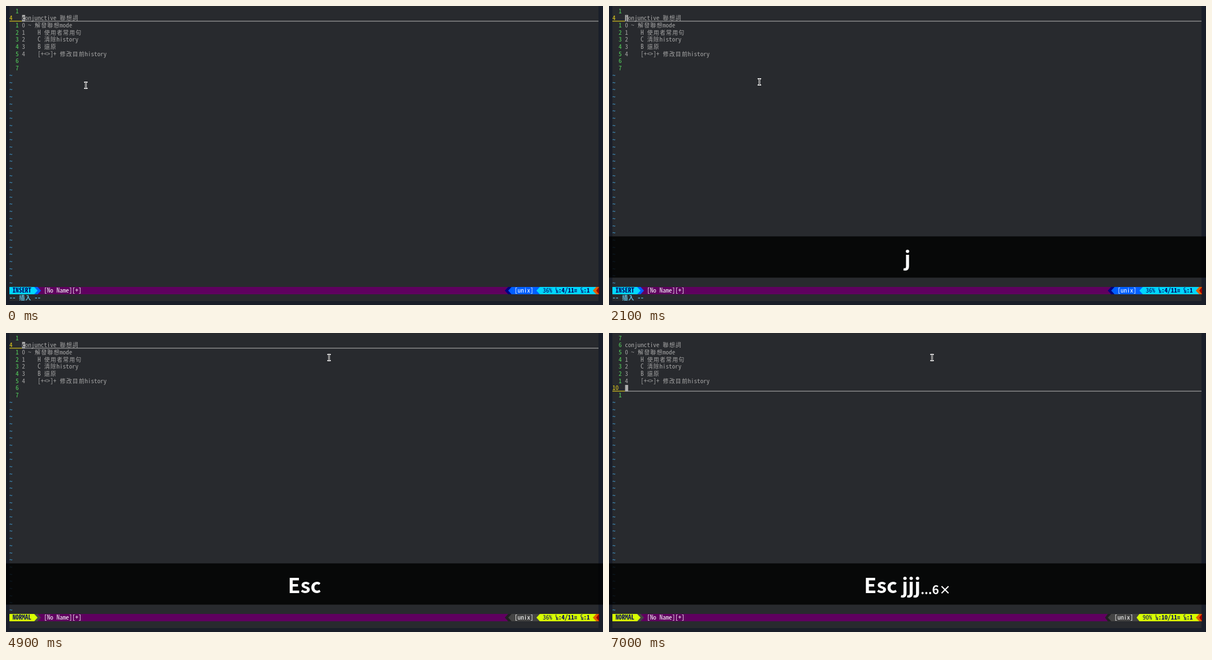
Animation, 1058 px wide and 530 px high, one loop 8 s. Source, as an HTML page with a canvas:

```html
<!DOCTYPE html>
<html lang="zh-Hant">
<head>
<meta charset="utf-8">
<title>Editor session</title>
<style>
html, body { margin: 0; width: 100%; height: 100%; overflow: hidden; background: #191e29; }
canvas { display: block; }
</style>
</head>
<body>
<canvas id="stage" width="1058" height="530"></canvas>
<script>
const ctx = document.getElementById('stage').getContext('2d');
const W = 1058, H = 530, LOOP = 8000;
const CELL = 5.56, ROW = 12.7, LEFT = 6, TOP = 2.65, RIGHT = 1050;
const COLS = 188, GUTTER = 4, STATUS_ROW = 39;
const MONO = '"Noto Sans Mono CJK TC", "Noto Sans Mono CJK JP", "Noto Sans Mono CJK SC", "Noto Sans Mono", monospace';
const SANS = '"Noto Sans CJK TC", "Noto Sans CJK JP", "Noto Sans CJK SC", "Noto Sans", sans-serif';
const BG = '#282a2e', FG = '#aeaeae', TEXT = '#a4a4a4';
const GREEN = '#55d35d', YELLOW = '#e8d21c', TILDE = '#3c86b4';

const LINES = [
  '',
  'conjunctive 聯想詞',
  '0 ~ 解發聯想mode',
  '1    H 使用者常用句',
  '2    C 清除history',
  '3    B 還原',
  '4    [+<>]+ 修改目前history',
  '',
  ''
];
const FIRST = 3; // file line shown on the top row
const TOTAL = 11;

const THEMES = {
  INSERT: { a: '#00d7ff', b: '#005fff', x: '#000080' },
  NORMAL: { a: '#d7ff00', b: '#444444', x: '#202020' }
};

// Each step overrides part of the state from its time on.
const START = {
  line: 4, typed: '', pending: '', col: 1, mode: 'INSERT', message: true,
  keys: '', count: 0, band: 0, popup: 0, mouse: [141, 140]
};
const STEPS = [
  [800, { popup: 0.5 }],
  [900, { popup: 1 }],
  [1300, { mouse: [205, 150] }],
  [1400, { mouse: [266, 134] }],
  [2000, { popup: 0.45, band: 0.6, keys: 'j', pending: 'j' }],
  [2100, { popup: 0, band: 1 }],
  [2200, { keys: 'jj', typed: 'j' }],
  [2400, { keys: 'jjj' }],
  [2500, { typed: 'jj' }],
  [3100, { keys: 'jj', mouse: [330, 121] }],
  [3300, { pending: '', col: 3, mouse: [572, 43] }],
  [3600, { keys: 'j', typed: 'j', col: 2 }],
  [3800, { keys: '', typed: '', col: 1 }],
  [4400, { keys: 'Esc', message: false }],
  [4900, { mode: 'NORMAL' }],
  [5400, { keys: 'Esc j', line: 5 }],
  [5900, { keys: 'Esc jjj', line: 7 }],
  [6200, { count: 4, line: 8 }],
  [6500, { count: 5, line: 9 }],
  [6700, { count: 6, line: 10 }]
];

function stateAt(t) {
  const s = { ...START };
  for (const [time, patch] of STEPS) if (t >= time) Object.assign(s, patch);
  return s;
}

const cellX = c => LEFT + c * CELL;
const rowY = r => TOP + r * ROW;

function rect(x, y, w, h, color) {
  ctx.fillStyle = color;
  ctx.fillRect(x, y, w, h);
}

function cells(c0, c1, r, color) {
  const x = Math.round(cellX(c0)), y = Math.round(rowY(r));
  rect(x, y, Math.round(cellX(c1)) - x, Math.round(rowY(r + 1)) - y, color);
}

// Writes on the character grid; returns the next free column.
function write(str, col, row, color, weight = 400) {
  ctx.textAlign = 'center';
  ctx.fillStyle = color;
  const y = rowY(row) + 9.9;
  for (const ch of str) {
    const span = ch.charCodeAt(0) > 0x2e80 ? 2 : 1;
    ctx.font = `${weight} ${span > 1 ? 10 : 11.12}px ${MONO}`;
    if (ch !== ' ') ctx.fillText(ch, cellX(col + span / 2), y);
    col += span;
  }
  return col;
}

function arrow(col, dir, color, back) {
  cells(col, col + 1, STATUS_ROW, back);
  const x0 = Math.round(cellX(col)), x1 = Math.round(cellX(col + 1));
  const y0 = Math.round(rowY(STATUS_ROW)), y1 = Math.round(rowY(STATUS_ROW + 1));
  const base = dir > 0 ? x0 : x1, tip = dir > 0 ? x1 : x0;
  ctx.fillStyle = color;
  ctx.beginPath();
  ctx.moveTo(base, y0);
  ctx.lineTo(tip, (y0 + y1) / 2);
  ctx.lineTo(base, y1);
  ctx.fill();
}

// Two small letters stacked in one cell.
function stacked(upper, lower, col, color) {
  const x = cellX(col + 0.5), y = rowY(STATUS_ROW);
  ctx.font = `700 6px ${SANS}`;
  ctx.textAlign = 'center';
  ctx.fillStyle = color;
  ctx.fillText(upper, x - 0.8, y + 6);
  ctx.fillText(lower, x + 0.6, y + 11);
}

function drawText(s) {
  LINES.forEach((line, r) => {
    const n = r + FIRST, dist = Math.abs(n - s.line);
    if (dist) {
      write(String(dist).padStart(3), 0, r, GREEN);
      write(line, GUTTER, r, TEXT);
      return;
    }
    write(String(n), 0, r, YELLOW);
    const y = rowY(r) + 11, split = Math.round(cellX(GUTTER));
    rect(LEFT, y, split - LEFT, 1.1, YELLOW);
    rect(split, y, RIGHT - split, 1.1, FG);
    const text = s.typed + (s.pending ? s.pending + line.slice(1) : line);
    const at = s.typed.length, col = GUTTER + at;
    write(text, GUTTER, r, TEXT);
    rect(cellX(col) + 0.3, rowY(r) + 0.5, CELL - 0.2, 11.3, FG);
    write(text.charAt(at), col, r, BG);
  });
  for (let r = LINES.length; r < STATUS_ROW; r++) write('~', 0, r, TILDE, 700);
}

function drawStatus(s) {
  const R = STATUS_ROW, th = THEMES[s.mode], ink = '#00005f', purple = '#5f005f';
  cells(0, COLS, R, purple);
  cells(0, 8, R, th.a);
  write(s.mode, 1, R, ink, 700);
  arrow(8, 1, th.a, th.b);
  arrow(9, 1, th.b, purple);
  write('[No Name][+]', 11, R, '#ffffff');

  const pos = `:${s.line}/${TOTAL}`;
  let c = COLS - 25 - pos.length;
  arrow(c++, -1, th.x, purple);
  arrow(c++, -1, th.b, th.x);
  cells(c, c + 8, R, th.b);
  write('[unix]', c + 1, R, '#ffffff');
  c += 8;
  arrow(c++, -1, th.a, th.b);
  cells(c, COLS - 2, R, th.a);
  c = write(Math.floor(s.line * 100 / TOTAL) + '%', c + 1, R, ink) + 1;
  stacked('L', 'N', c++, ink);
  c = write(pos, c, R, ink, 700);
  for (let i = 0; i < 3; i++) {
    rect(cellX(c) + 0.5, Math.round(rowY(R)) + 4 + i * 2, 4.5, 1, ink);
  }
  c += 2;
  stacked('C', 'N', c++, ink);
  write(':' + s.col, c, R, ink, 700);
  arrow(COLS - 2, -1, '#df5f00', th.a);
  arrow(COLS - 1, -1, '#990000', '#df5f00');
  if (s.message) write('-- 插入 --', 0, R + 1, '#5fc4e6', 700);
}

function drawPopup(alpha) {
  ctx.globalAlpha = alpha;
  rect(28, 37, 25, 30, '#f0f0ef');
  ctx.font = `400 18px ${SANS}`;
  ctx.textAlign = 'center';
  ctx.fillStyle = '#222222';
  ctx.fillText('A', 40.5, 59);
  ctx.globalAlpha = 1;
}

function drawKeys(s) {
  ctx.globalAlpha = s.band * 0.82;
  rect(0, 408.4, W, 73.1, '#000000');
  ctx.globalAlpha = s.band;
  const big = `700 36px ${SANS}`, small = `700 21px ${SANS}`;
  const note = s.count ? `...${s.count}×` : '';
  ctx.textAlign = 'left';
  ctx.font = small;
  const noteWidth = ctx.measureText(note).width;
  ctx.font = big;
  const keysWidth = ctx.measureText(s.keys).width;
  const x = W / 2 - (keysWidth + noteWidth) / 2;
  ctx.fillStyle = '#ffffff';
  ctx.fillText(s.keys, x, 461);
  ctx.font = small;
  ctx.fillText(note, x + keysWidth, 463);
  ctx.globalAlpha = 1;
}

function drawMouse([x, y]) {
  rect(x - 2.5, y - 6, 6, 2, '#f4f4f4');
  rect(x - 2.5, y + 5, 6, 2, '#f4f4f4');
  rect(x - 1, y - 5, 3, 11, '#e4e4e4');
  rect(x, y - 5, 1, 11, '#111111');
}

function draw(t) {
  const s = stateAt(t);
  rect(0, 0, W, H, '#191e29');
  rect(LEFT, 0, RIGHT - LEFT, 523, BG);
  drawText(s);
  drawStatus(s);
  if (s.popup) drawPopup(s.popup);
  if (s.band) drawKeys(s);
  drawMouse(s.mouse);
}

const began = performance.now();
function tick() {
  draw((performance.now() - began) % LOOP);
  requestAnimationFrame(tick);
}
tick();
</script>
</body>
</html>
```
